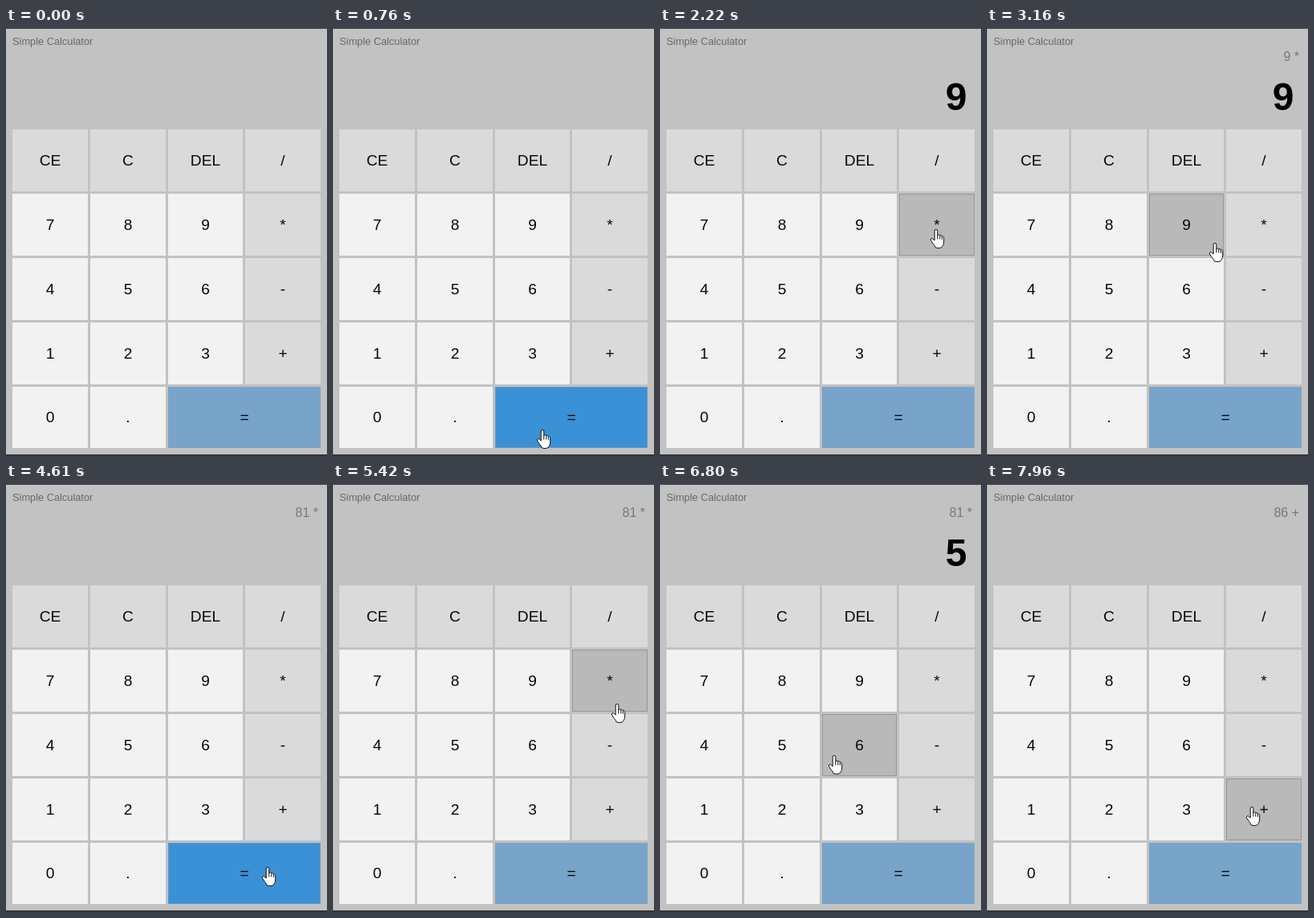
Animation, 400 px wide and 532 px high, one loop 8000 ms. Source, as an HTML page:

```html
<!DOCTYPE html>
<html lang="en">
<head>
<meta charset="utf-8">
<title>Calculator</title>
<style>
html, body { margin: 0; width: 100%; height: 100%; overflow: hidden; background: #c2c2c2; }
svg { display: block; width: 100%; height: 100%; font-family: "Liberation Sans", Arial, sans-serif; }
.key { font-size: 19.2px; text-anchor: middle; fill: #080808; }
.out { text-anchor: end; white-space: pre; }
</style>
</head>
<body>
<svg id="stage" viewBox="0 0 400 532"></svg>
<script>
const LOOP = 8000, STEP = 72.7, START = 609;
const NS = "http://www.w3.org/2000/svg";
const stage = document.getElementById("stage");

function add(tag, attrs, text) {
  const el = document.createElementNS(NS, tag);
  for (const name in attrs) el.setAttribute(name, attrs[name]);
  if (text) el.textContent = text;
  return stage.appendChild(el);
}

add("rect", { width: 400, height: 532, fill: "#c2c2c2" });
add("rect", { width: 400, height: 1, fill: "#3c3c3c" });
add("rect", { y: 530, width: 400, height: 2, fill: "#363636" });
add("text", { x: 8, y: 21, "font-size": 12.8, fill: "#686868" }, "Simple Calculator");
const history = add("text", { class: "out", x: 389, y: 41, "font-size": 16, fill: "#787878" });
const entry = add("text", { class: "out", x: 382.5, y: 102, "font-size": 48, "font-weight": 700 });

const column = c => Math.ceil(8 + c * 290 / 3);
const rows = ["CE C DEL /", "7 8 9 *", "4 5 6 -", "1 2 3 +", "0 . ="];

const keys = rows.flatMap((row, r) => row.split(" ").map((label, c) => {
  const equals = label === "=";
  const x = column(c), y = 126 + r * 80;
  const w = column(equals ? 4 : c + 1) - 3 - x, h = r === 4 ? 76 : 77;
  const fill = equals ? "#78a4c9" : r === 0 || c === 3 ? "#dadada" : "#f2f2f2";
  const hover = equals ? "#3b91d6" : "#b9b9b9";
  const box = add("rect", { x, y, width: w, height: h, fill });
  const edge = add("rect", {
    x: x + .5, y: y + .5, width: w - 1, height: h - 1,
    fill: "none", stroke: equals ? "#5f98c8" : "#979797"
  });
  add("text", { class: "key", x: x + w / 2, y: y + h / 2 + 6.3 }, label);
  return { label, x, y, w, h, fill, hover, box, edge };
}));

// Pointing hand, with the fingertip at 0,0
const hand = add("path", {
  d: "M-1.8 14V2Q-1.8.5 0 .5T1.8 2V8Q2 6.6 3.4 6.8T4.8 8.3Q5 7.3 6.2 7.6T7.4 9.3" +
     "Q7.8 8.6 8.7 9T9.7 10.8V16Q9.7 18.5 8.4 20.5Q7.4 22 6.5 23Q3 24.2-.6 23" +
     "Q-1.6 20.5-3.6 18.3L-6.3 14.3Q-7.2 12.6-6 11.8Q-4.6 11.2-3.3 12.7Z" +
     "M1.8 8V12.5M4.8 8.3V12.5M7.4 9.3V12.8",
  fill: "#fff", stroke: "#111", "stroke-width": 1, "stroke-linejoin": "round"
});

// Pointer moves: departure, arrival, x, y
const moves = [
  [610, 1420, 194, 247], [1420, 1560, 288, 255], [1710, 2150, 344, 250],
  [2510, 2900, 284, 267], [3160, 3750, 322, 464], [4530, 4610, 326, 476],
  [4610, 5420, 354, 273], [5420, 6220, 165, 325], [6400, 6800, 217, 337],
  [6800, 7670, 329, 404], [7810, 7960, 330, 401]
];
const clicks = [1710, 2360, 2950, 3970, 6300, 7810];

const ease = k => k * k * (3 - 2 * k);

function pointAt(t) {
  let x = 268, y = 525;
  for (const [from, to, nx, ny] of moves) {
    const k = ease(Math.min(1, Math.max(0, (t - from) / (to - from))));
    x += (nx - x) * k;
    y += (ny - y) * k;
  }
  return { x, y };
}

// Each key also owns half of the gap around it
const covers = (k, p) =>
  Math.abs(p.x - k.x - k.w / 2) <= k.w / 2 + 1.5 && Math.abs(p.y - k.y - k.h / 2) <= k.h / 2 + 1.5;

function calculate(t) {
  let total = null, op = "", typed = "";
  for (const time of clicks.filter(c => c <= t)) {
    const { label } = keys.find(k => covers(k, pointAt(time)));
    if (label >= "0" && label <= "9") { typed += label; continue; }
    if (label !== "=") op = label;
    if (total === null) total = +typed;
    else total = op === "*" ? total * typed : total + +typed;
    typed = "";
  }
  return { past: total === null ? "" : `${total} ${op}`, typed };
}

function draw(time) {
  const visible = time >= START;
  // The screen refreshes in steps
  const t = visible ? START + 10 + Math.floor((time - START) / STEP) * STEP : 0;
  const p = pointAt(t);
  hand.setAttribute("visibility", visible ? "visible" : "hidden");
  hand.setAttribute("transform", `translate(${Math.round(p.x)} ${Math.round(p.y)})`);
  for (const k of keys) {
    const over = visible && covers(k, p);
    k.box.setAttribute("fill", over ? k.hover : k.fill);
    k.edge.setAttribute("visibility", over ? "visible" : "hidden");
  }
  const { past, typed } = calculate(t);
  history.textContent = past;
  entry.textContent = typed;
}

const begin = performance.now();
function tick() {
  draw((performance.now() - begin) % LOOP);
  requestAnimationFrame(tick);
}
tick();
</script>
</body>
</html>
```
